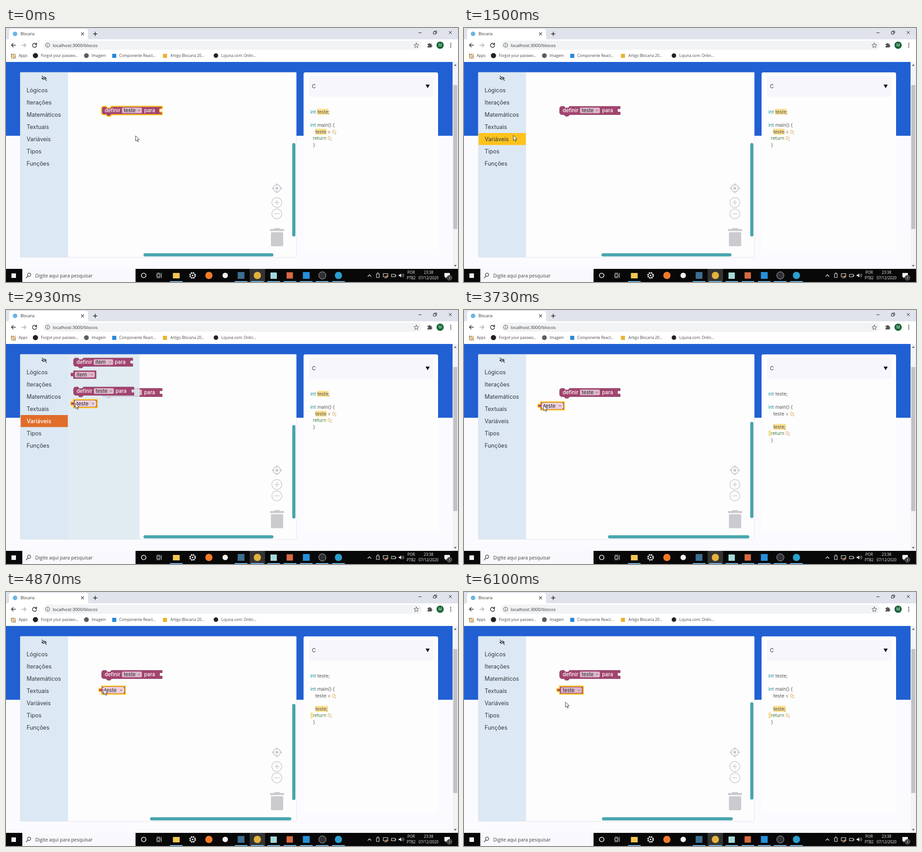
These frames come from a looping animation (998 by 561 pixels, 6130 ms). An HTML page:

```html
<!DOCTYPE html>
<html lang="pt-BR">
<head>
<meta charset="utf-8">
<title>Editor de blocos</title>
<style>
html, body { margin: 0; width: 100%; height: 100%; overflow: hidden; background: #fbfbff; }
svg { display: block; width: 100%; height: 100%; }
text { font-family: "Open Sans", sans-serif; white-space: pre; }
.app text { font-family: Inter, "Open Sans", sans-serif; }
.line { fill: none; stroke-linecap: round; stroke-linejoin: round; }
</style>
</head>
<body>
<svg id="stage" viewBox="0 0 998 561"></svg>
<script>
const LOOP = 6130;
const GOLD = '#fdc31c', PURPLE = '#a2446f', TEAL = '#48a5ae';

// Shape helpers; y of a text is its vertical middle.
const rect = (x, y, w, h, fill, extra = '') =>
  `<rect x="${x}" y="${y}" width="${w}" height="${h}" fill="${fill}" ${extra}/>`;
const disc = (x, y, r, fill, extra = '') =>
  `<circle cx="${x}" cy="${y}" r="${r}" fill="${fill}" ${extra}/>`;
const line = (d, color, width = 1.2) =>
  `<path class="line" d="${d}" stroke="${color}" stroke-width="${width}"/>`;
const fill = (d, color, extra = '') => `<path d="${d}" fill="${color}" ${extra}/>`;
const text = (x, y, size, s, color = '#333', extra = '') =>
  `<text x="${x}" y="${y + size * .36}" font-size="${size}" fill="${color}" ${extra}>${s}</text>`;
const group = (id, body, x = 0, y = 0) =>
  `<g id="${id}" transform="translate(${x} ${y})">${body}</g>`;
const middle = 'text-anchor="middle"';

function field(x, w, h, name) {
  return rect(x, h / 2 - 6.2, w, 12.4, '#fff', 'class="field" rx="2.5" fill-opacity=".62"') +
    text(x + 4, h / 2, 11.2, name, '#2c2030') +
    fill(`M${x + w - 9} ${h / 2 - 1}h5l-2.5 3z`, '#a2708c');
}

function setter(name, fieldX, fieldW, paraX, w) {
  const d = `M0 5a5 5 0 0 1 5-5H10l3 3.5h6l3-3.5H${w}V4c0 5-6-3-6 5s6 0 6 5V18.5` +
    'H22l-3 3.5h-6l-3-3.5H5a5 5 0 0 1-5-5z';
  const label = 'font-weight="500"';
  return fill(d, PURPLE, 'class="body" stroke="#82375a" stroke-width=".7"') +
    text(7, 9, 11.2, 'definir', '#fff', label) + field(fieldX, fieldW, 18, name) +
    text(paraX, 9, 11.2, 'para', '#fff', label);
}

function getter(name, w) {
  const d = `M0 0H${w}V17.5H0V13c0-4-6 3-6-4.5s6 0 6-4.5z`;
  return fill(d, PURPLE, 'class="body" stroke="#82375a" stroke-width=".7"') +
    field(3, w - 6, 17.5, name);
}

function browser() {
  let s = rect(0, 0, 998, 26, '#e0e3eb') + fill('M2 26q5 0 5-6V7q0-5 5-5H176q5 0 5 5V20q0 6 5 6z', '#fff') +
    disc(20, 13, 5, '#69b5e5') + text(32, 13, 8.3, 'Blocaria') +
    line('M166.5 10.5l5 5m0-5l-5 5', '#222') + line('M193 13h8m-4-4v8', '#222', 1.4) +
    line('M911 10.5h6M944 8.500h5v5h-5zM946 8.500V6.500h5v5h-2M978 7l6 6m0-6l-6 6', '#222', 1);
  s += rect(0, 25, 998, 50, '#fff') + rect(82, 28, 836, 20, '#f1f3f5', 'rx="10"') +
    line('M21 38H12m4-4l-4 4 4 4', '#333', 1.5) + line('M35 38h9m-4-4l4 4-4 4', '#aaa', 1.4) +
    line('M66.500 35.500A4.500 4.500 0 1 0 67.500 38.500M67.500 33v3.500h-3.500', '#333', 1.5) +
    disc(92, 38, 4.5, 'none', 'stroke="#555" stroke-width="1.1"') + line('M92 38v2.500M92 35.700v.1', '#555') +
    text(103, 38, 9.8, 'localhost:3000/blocos', '#333') +
    line('M906 33l1.500 3.600 3.800.3-2.900 2.500.9 3.800-3.300-2-3.300 2 .9-3.800-2.900-2.500 3.800-.3z', '#555', 1) +
    fill('M930.500 35h3a1.800 1.800 0 0 1 3.600 0h2.500v3a1.800 1.800 0 0 1 0 3.600V43h-9v-2.500a1.800 1.800 0 0 0 0-3.600z', '#555') +
    disc(958.5, 38, 8, '#176638') + text(958.5, 38, 8.5, 'M', '#fff', middle);
  for (const y of [34, 38, 42]) s += disc(982, y, 1.2, '#444');
  for (let i = 0; i < 9; i++)
    s += rect(11 + i % 3 * 3.8, 57 + (i / 3 | 0) * 3.8, 2.7, 2.7, ['#de4c3f', '#45a05c', '#e5a932'][(i + (i / 3 | 0)) % 3]);
  return s + disc(65, 61, 5.8, '#222') + disc(177.5, 61, 5.3, '#5b5d62') +
    rect(234.5, 57, 9, 9, '#2688d9') + rect(346.5, 57, 9, 9, '#e8b32f') + disc(463.5, 61, 5, '#222') +
    [[28, 'Apps'], [77, 'Forgot your passwo...'], [189, 'Imagem'], [250, 'Componente React...'],
     [363, 'Artigo Blocaria 20...'], [475.5, 'Lojuna.com: Onlin...']]
      .map(([x, s]) => text(x, 61, 8.3, s, '#444')).join('');
}

function controls() {
  const grey = '#cbcacf';
  const ring = y => disc(598, y, 11, 'none', `stroke="${grey}" stroke-width="1.4"`);
  return disc(598, 354, 8, 'none', `stroke="${grey}" stroke-width="2"`) + disc(598, 354, 3.3, grey) +
    line('M598 344v3m0 14v3M587.500 354h3m15 0h3', grey, 2.4) +
    ring(385.5) + ring(410.5) + line('M593 385.500h10m-5-5v10M593 410.500h10', grey, 1.6) +
    rect(583, 444, 31, 4.5, grey) + rect(592, 442, 13, 3, grey) + rect(585, 451, 27, 31, grey, 'rx="2"');
}

function page() {
  const names = ['Lógicos', 'Iterações', 'Matemáticos', 'Textuais', 'Variáveis', 'Tipos', 'Funções'];
  const toolbox = rect(32, 98, 105, 408, '#dce8f3') + rect(32.5, 232, 104, 26.5, GOLD, 'id="row"') +
    fill('M78 111q6-7 12 0q-6 7-12 0z', '#333') + disc(84, 111, 2.2, '#dce8f3') + disc(84, 111, 1.2, '#333') +
    line('M79 106l10 10', '#dce8f3', 3) + line('M79.500 106l10 10', '#333', 1.3) +
    names.map((s, i) => text(45.5, 137 + 27 * i, 12.5, s, '#34383f', i == 4 ? 'id="rowName"' : '')).join('');
  const flyout = rect(137, 98, 158, 408, '#dce8f0', 'fill-opacity=".84"') +
    group('', setter('item', 44.5, 43, 91, 131), 149, 106) + group('', getter('item', 50), 149, 134) +
    group('', setter('teste', 45, 44, 93, 133.5), 149, 170);
  return rect(0, 75, 986, 457, '#fbfbff') + rect(0, 75, 986, 163, '#2160d3') +
    rect(31.5, 98, 609.5, 408.5, '#fdfdfe', 'stroke="#dcdfe3" stroke-width=".8" rx="1"') +
    group('setter', setter('teste', 45, 44, 94, 134), 211, 173) +
    group('flyout', flyout) + controls() + toolbox +
    `<rect id="barH" y="497.500" height="7" rx="3.500" fill="${TEAL}"/>` +
    `<rect id="barV" x="632" width="7" rx="3.500" fill="${TEAL}"/>` +
    group('getter', getter('teste', 52.5)) +
    rect(657, 98, 297, 391.5, '#fdfdfe', 'rx="4"') + rect(669, 106, 274.5, 45.5, '#f6f6fc', 'rx="2"') +
    text(675.5, 129, 11.5, 'C') + fill('M926.500 125h9l-4.500 8z', '#111') + group('code', '') +
    rect(986, 75, 12, 457, '#f3f3f6') + rect(987.5, 126, 9, 318, '#c2c2c6') +
    fill('M989 83.500h6l-3-3.500z', '#555') + fill('M989 523.500h6l-3 3.500z', '#555');
}

function codeText(extended) {
  const word = (x, y, s, color = '#555') => text(x, y, 10.4, s, color);
  const mark = (x, y, w) => rect(x, y - 6.5, w, 13, '#fbdf8c');
  const green = '#138b89', orange = '#e99a1c';
  const y = extended ? 272.5 : 243.5;
  return (extended ? mark(683, 258, 27.5) + mark(672.5, 272.5, 4.5) : mark(687, 185, 25.5) + mark(683, 229, 25)) +
    word(672, 185, 'int', green) + word(687.5, 185, 'teste;') +
    word(672, 214, 'int', green) + word(687.5, 214, 'main() {') +
    word(683, 229, 'teste =') + word(720, 229, '0', orange) + word(726.5, 229, ';') +
    (extended ? word(683, 258, 'teste;') : '') +
    word(677.5, y, 'return', '#467f3c') + word(710, y, '0', orange) + word(716.5, y, ';') +
    word(678, y + 14.3, '}');
}

function taskbar() {
  const white = '#f2f2f2';
  let s = rect(0, 532, 998, 29, '#080808') + rect(36, 532, 250, 29, '#f8f8fd') +
    rect(538, 532, 34, 29, '#343434') + rect(12, 542, 10, 10, white) +
    disc(51, 545, 3.6, 'none', 'stroke="#333" stroke-width="1.2"') + line('M48.500 548l-4 4', '#333') +
    text(64.5, 547, 10.4, 'Digite aqui para pesquisar', '#444') +
    disc(304, 546.5, 5, 'none', `stroke="${white}" stroke-width="1.6"`) +
    line('M333 544h7v5h-7zM333 541.500h7M333 551.500h7M343 541.500v10', white, 1.1);
  for (const x of [376, 519, 555, 591, 627, 663, 698, 734]) s += rect(x - 14, 559, 28, 2, '#72b5e8');
  s += rect(368.5, 541, 15, 12, '#f3c653') +
    disc(412, 546.5, 6, 'none', `stroke="${white}" stroke-width="2.6" stroke-dasharray="3 1.710"`) +
    disc(412, 546.5, 4.8, 'none', `stroke="${white}"`) + disc(412, 546.5, 1.8, white) +
    disc(448, 546.5, 8, '#f27a29') + disc(484, 546.5, 6, white) + rect(511.5, 539, 15, 15, '#3c6f91') +
    disc(555, 546.5, 8, '#e3b23c') + rect(584, 540, 14, 14, '#a5d8d9') + rect(619.5, 539.5, 14, 14, '#d86a42') +
    rect(655.5, 539, 15, 15, '#2590db') + disc(698.5, 546.5, 8, '#302f35', 'stroke="#bbb"') +
    disc(734, 546.5, 8, '#2a9fd0');
  s += line('M799 548.500l3.500-3.500 3.500 3.500', white) +
    line('M818 543h6v8h-6zM819.500 541h3M833 542.500h10v7h-10zM836 552h4M851 544h8.500v5.500H851zM861 546v2', white, 1.1) +
    disc(841, 549, 2.5, '#d17b45') + fill('M867 545h2.500l3-3v9l-3-3H867z', white) +
    line('M874.500 544.500q2 2 0 4m2-6q4 4 0 8', white, .9);
  for (const [x, y, word] of [[894.5, 540.5, 'POR'], [894.5, 552.5, 'PTB2'], [933, 540.5, '23:38'], [933, 552.5, '07/12/2020']])
    s += text(x, y, 8.3, word, white, middle);
  return s + fill('M968 541h12v9h-7l-3 3v-3h-2z', white) +
    disc(979, 551.5, 5.5, '#333', 'stroke="#aaa" stroke-width=".8"') + text(979, 551.5, 7.5, '3', '#fff', middle);
}

const stage = document.getElementById('stage');
stage.innerHTML = `<g class="app">${page()}</g>` + browser() + taskbar() +
  group('cursor', fill('M0 0V11.500l2.700-2.500 1.800 4.300 1.900-.8-1.800-4.200h3.700z', '#fff', 'stroke="#222" stroke-width=".9"'));
const $ = id => document.getElementById(id);

// Tracks hold [time, x, y] stops.
const cursorPath = [[0, 286, 238], [500, 286, 238], [1280, 113, 238], [1500, 109, 237], [1780, 110, 237],
  [2030, 118, 231], [2550, 135, 222], [2860, 153, 206], [3250, 153, 206], [3730, 176, 211],
  [4300, 199, 213], [4870, 216, 215], [5450, 216, 215], [5740, 220, 230], [6100, 224, 243]];
const blockPath = [[0, 149, 198], [3250, 149, 198], [3730, 169, 203], [4300, 193, 206], [4870, 211, 208]];

function along(path, t) {
  const i = path.findIndex(p => p[0] > t);
  if (i < 0) return path.at(-1).slice(1);
  const [a, b] = [path[i - 1], path[i]];
  const k = (t - a[0]) / (b[0] - a[0]);
  return [1, 2].map(n => a[n] + (b[n] - a[n]) * k);
}

const place = (id, pos) => $(id).setAttribute('transform', `translate(${pos.map(v => v.toFixed(2))})`);
const show = (id, on) => $(id).setAttribute('visibility', on ? 'visible' : 'hidden');
function set(el, attrs) {
  for (const key in attrs) el.setAttribute(key, attrs[key]);
}
function select(id, on) {
  set($(id).querySelector('.body'), { stroke: on ? GOLD : '#82375a', 'stroke-width': on ? 2.3 : .7 });
}

let codeState;
function draw(now) {
  const t = now % LOOP;
  const open = t >= 1640 && t < 3300;
  const hover = t >= 1190 && t < 1640;
  const dragged = t >= 3300, dropped = t >= 5300;
  place('cursor', along(cursorPath, t));
  place('getter', along(blockPath, t));
  show('flyout', open);
  show('getter', open || dragged);
  show('row', open || hover);
  set($('row'), { fill: open ? '#e06d29' : GOLD });
  set($('rowName'), { fill: open ? '#fff' : '#34383f', 'font-weight': open ? 500 : 400 });
  select('setter', t < 1450);
  select('getter', t >= 2880);
  const over = t >= 2860 && t < 5600;
  set($('getter').querySelector('.field'), { stroke: over ? '#fff' : 'none', 'fill-opacity': over ? .74 : .62 });
  const [x, w, y, h] = dropped ? [304.5, 289, 243.5, 215] : dragged ? [318, 312, 247, 212.5] : [303.5, 287, 254, 206.5];
  set($('barH'), { x, width: w });
  set($('barV'), { y, height: h });
  if (codeState !== dragged) $('code').innerHTML = codeText(codeState = dragged);
}

const start = performance.now();
function tick() {
  draw(performance.now() - start);
  requestAnimationFrame(tick);
}
tick();
</script>
</body>
</html>
```
